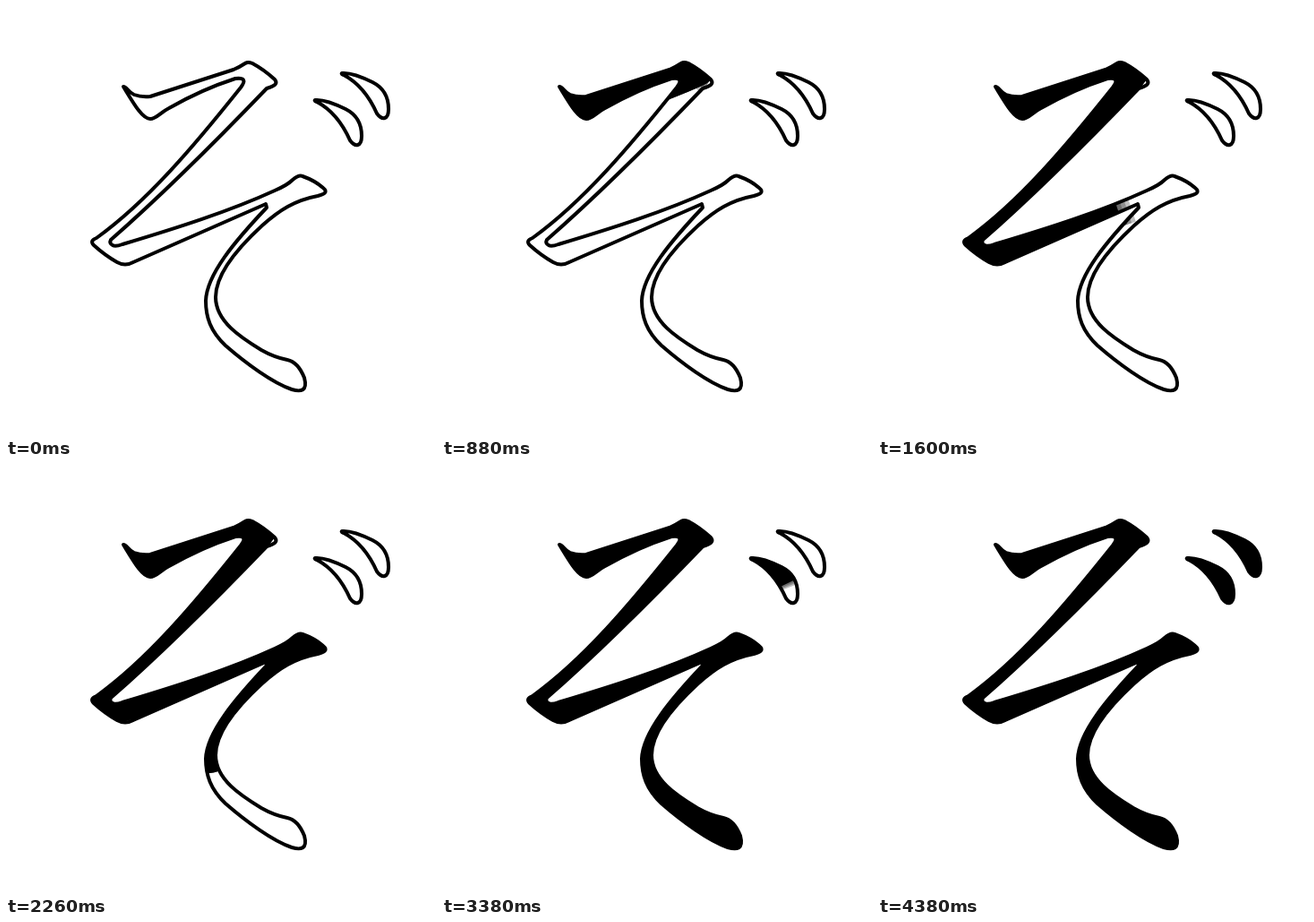
An HTML page with a canvas for the animation above (4710 ms loop, 480x480 px).

```html
<!DOCTYPE html>
<html lang="ja">
<head>
<meta charset="utf-8">
<title>ぞ</title>
<style>
html, body { margin: 0; width: 100%; height: 100%; overflow: hidden; background: #fff; }
canvas { display: block; width: 480px; height: 480px; }
</style>
</head>
<body>
<canvas id="stage" width="480" height="480"></canvas>
<script>
const ctx = document.getElementById('stage').getContext('2d');
const LOOP = 4710, STEP = 60, PEN = 40;

// Outline of the long stroke, along its outer side and back.
const there = 'M131 90C135 90 136 96 143 99Q151 102 161 101L254 71Q261 68 267 64' +
  'Q270 62 275 64Q288 71 300 82C304 87 300 89 291 92' +
  'C241 144 181 205 117 261Q115 265 119 267Q122 269 130 266' +
  'C190 248 250 229 300 206Q314 200 320 194Q327 188 331 190Q345 195 354 203' +
  'C360 208 355 210 348 212C322 217 305 228 286 245C262 267 234 298 234 325' +
  'C234 352 262 370 285 384Q299 392 314 395C324 397 329 405 333 415';
const back = 'C337 430 329 431 319 428C298 421 268 399 245 379' +
  'C228 363 223 347 223 329C224 300 255 263 291 225L290 221' +
  'L142 286Q133 291 124 286Q110 278 98 267Q93 262 101 259' +
  'C158 218 211 155 262 91Q271 79 256 81' +
  'C225 91 196 106 182 114C172 119 168 126 161 126C152 126 142 108 131 90Z';
const tick = 'M345 105C356 104 369 110 379 115C393 122 397 134 397 145' +
  'C397 157 390 158 384 150C376 132 364 116 347 107Q344 106 345 105Z';

// Each pen line is a chain of quadratic limbs: point, control, point, control, point...
const bodyPen = [[128, 84], [140, 134], [284, 70], [205, 175], [112, 272], [220, 245],
  [340, 201], [232, 248], [228, 325], [224, 372], [328, 424]];
const tickPen = [[342, 102], [388, 112], [392, 160]];

const body = new Path2D(there + back), mark = new Path2D(tick);
const strokes = [
  { path: body, pen: bodyPen, start: 460, steps: 38, shift: 0 },
  { path: mark, pen: tickPen, start: 3140, steps: 8, shift: 0 },
  { path: mark, pen: tickPen, start: 3960, steps: 8, shift: 30 }
];

const clamp = u => Math.min(1, Math.max(0, u));
const ease = u => u * u * (3 - 2 * u);
const mix = (a, b, u) => [a[0] + (b[0] - a[0]) * u, a[1] + (b[1] - a[1]) * u];

// The first part u of one limb
function limb(a, c, b, u) {
  const mid = mix(a, c, u), end = mix(mid, mix(c, b, u), u);
  ctx.lineCap = u < 1 ? 'butt' : 'round';
  ctx.beginPath();
  ctx.moveTo(...a);
  ctx.quadraticCurveTo(...mid, ...end);
  ctx.stroke();
}

function ink({ path, pen, start, steps }, t) {
  const done = Math.floor((t - start) / STEP) + 1;
  if (done <= 0) return;
  if (done >= steps) return ctx.fill(path);
  const count = (pen.length - 1) / 2;
  ctx.save();
  ctx.clip(path);
  ctx.lineWidth = PEN;
  for (let i = 0; i < count; i++) {
    const u = ease(clamp(done / steps * count - i));
    if (!u) break;
    // Faint passes run slightly ahead for a soft front.
    for (let lead = 3; lead >= 0; lead--) {
      ctx.globalAlpha = lead ? 0.25 : 1;
      limb(...pen.slice(2 * i, 2 * i + 3), clamp(u + lead * 0.02));
    }
  }
  ctx.restore();
}

function draw(t) {
  ctx.fillStyle = '#fff';
  ctx.fillRect(0, 0, 480, 480);
  ctx.fillStyle = ctx.strokeStyle = '#000';
  ctx.lineJoin = 'round';
  for (const s of strokes) {
    ctx.save();
    ctx.translate(s.shift, -s.shift);
    ink(s, t);
    ctx.lineWidth = 4;
    ctx.stroke(s.path);
    ctx.restore();
  }
}

const begin = performance.now();
function animate(now) {
  draw(Math.max(0, now - begin) % LOOP);
  requestAnimationFrame(animate);
}
draw(0);
requestAnimationFrame(animate);
</script>
</body>
</html>
```
